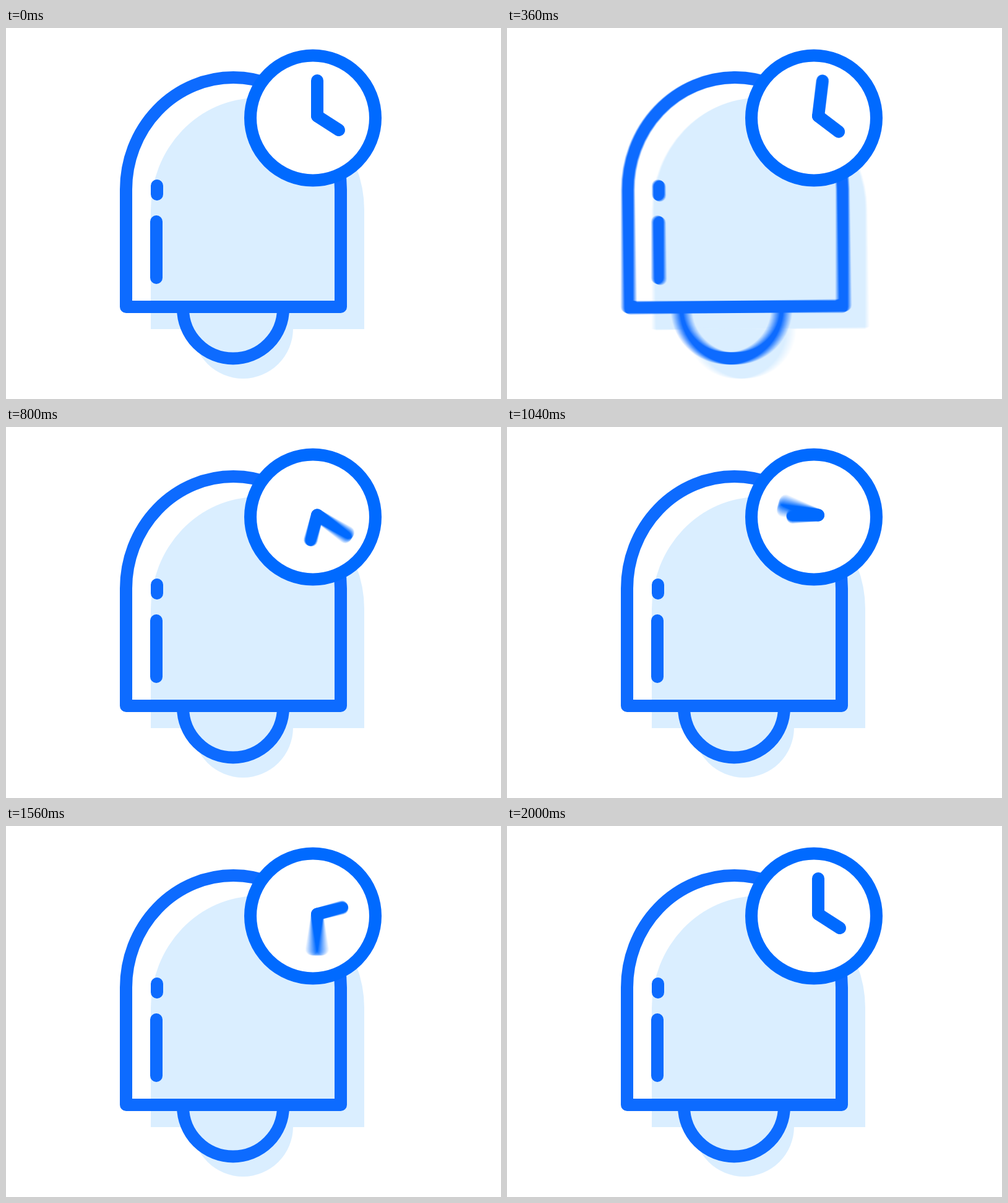
Animation of 800x600 px, one loop 2480 ms. Source, as an HTML page with a canvas:

```html
<!DOCTYPE html>
<html lang="en">
<head>
<meta charset="utf-8">
<title>Ringing bell with clock</title>
<style>
  html, body { margin: 0; width: 100%; height: 100%; overflow: hidden; background: #fff; }
  canvas { display: block; width: 800px; height: 600px; }
</style>
</head>
<body>
<canvas id="stage" width="800" height="600"></canvas>
<script>
const LOOP = 2480, STEP = 40, SHUTTER = 20, SAMPLES = 17;
const BELL_BLUE = '#0d6bff', CLOCK_BLUE = '#006aff', PALE = '#daeeff';
const BELL_PIVOT = [367.5, 80], HAND_PIVOT = [503, 142.5];

const stage = document.getElementById('stage').getContext('2d');
const layer = document.createElement('canvas');
layer.width = 800;
layer.height = 600;
const mask = layer.getContext('2d');

const shapes = {
  paleBell: new Path2D('M234 487V294A172.5 181 0 0 1 579 294V487Z'),
  paleClapper: new Path2D('M302 486A81 81 0 0 0 464 486Z'),
  bell: new Path2D('M194 451V261A173.5 181 0 0 1 541 261V451Z M244 255V269 M243 313V404'),
  clapper: new Path2D('M286 453.5A81 81 0 0 0 448 453.5'),
  minute: new Path2D('M503 142.5V85'),
  hour: new Path2D('M503 142.5L538 165')
};

// Swing keys: [time, degrees], cosine-eased between neighbours.
const bellKeys = [[0, 0], [240, 4], [480, -4.9], [590, 1.15], [720, 0]];
const clapperKeys = [[20, 0], [260, 4.8], [500, -5.2], [610, 1.2], [740, 0]];

function swing(keys, t) {
  if (t <= keys[0][0]) return 0;
  for (let i = 1; i < keys.length; i++) {
    const [t0, a] = keys[i - 1], [t1, b] = keys[i];
    if (t < t1) return a + (b - a) * (1 - Math.cos(Math.PI * (t - t0) / (t1 - t0))) / 2;
  }
  return 0;
}

// Cubic bezier easing through (x1, 0) and (x2, 1).
function ease(x, x1, x2) {
  if (x <= 0) return 0;
  if (x >= 1) return 1;
  let lo = 0, hi = 1;
  for (let i = 0; i < 30; i++) {
    const p = (lo + hi) / 2, q = 1 - p;
    if (3 * x1 * p * q * q + 3 * x2 * p * p * q + p * p * p < x) lo = p; else hi = p;
  }
  return lo * lo * (3 - 2 * lo);
}

const handProgress = t => (t - 200) / 1800;
const bellAngle = t => swing(bellKeys, t);
const clapperAngle = t => bellAngle(t) + swing(clapperKeys, t);
const minuteAngle = t => 1080 * ease(handProgress(t), 0.667, 0.584);
const hourAngle = t => 360 * ease(handProgress(t), 0.472, 0.585);

// Adds up the rotated shape over the open shutter, then tints the coverage.
function drawRotating(path, color, angleAt, pivot, t, stroke, cap = 'round') {
  const start = angleAt(t - SHUTTER / 2), end = angleAt(t + SHUTTER / 2);
  const count = Math.abs(end - start) < 0.02 && Math.abs(angleAt(t) - start) < 0.02 ? 1 : SAMPLES;
  mask.setTransform(1, 0, 0, 1, 0, 0);
  mask.globalAlpha = 1;
  mask.globalCompositeOperation = 'source-over';
  mask.clearRect(0, 0, 800, 600);
  mask.globalCompositeOperation = 'lighter';
  mask.globalAlpha = 1 / count;
  mask.fillStyle = mask.strokeStyle = '#fff';
  mask.lineWidth = 20;
  mask.lineCap = cap;
  mask.lineJoin = 'round';
  for (let i = 0; i < count; i++) {
    const offset = ((i + 0.5) / count - 0.5) * SHUTTER;
    mask.setTransform(1, 0, 0, 1, pivot[0], pivot[1]);
    mask.rotate(angleAt(t + offset) * Math.PI / 180);
    mask.translate(-pivot[0], -pivot[1]);
    if (stroke) mask.stroke(path); else mask.fill(path);
  }
  mask.setTransform(1, 0, 0, 1, 0, 0);
  mask.globalAlpha = 1;
  mask.globalCompositeOperation = 'source-in';
  mask.fillStyle = color;
  mask.fillRect(0, 0, 800, 600);
  stage.drawImage(layer, 0, 0);
}

function drawClockFace() {
  stage.beginPath();
  stage.arc(496, 145.5, 101, 0, 2 * Math.PI);
  stage.fillStyle = '#fff';
  stage.fill();
  stage.lineWidth = 20;
  stage.strokeStyle = CLOCK_BLUE;
  stage.stroke();
}

function draw(t) {
  stage.fillStyle = '#fff';
  stage.fillRect(0, 0, 800, 600);
  drawRotating(shapes.paleBell, PALE, bellAngle, BELL_PIVOT, t, false);
  drawRotating(shapes.paleClapper, PALE, clapperAngle, BELL_PIVOT, t, false);
  drawRotating(shapes.clapper, BELL_BLUE, clapperAngle, BELL_PIVOT, t, true, 'butt');
  drawRotating(shapes.bell, BELL_BLUE, bellAngle, BELL_PIVOT, t, true);
  drawClockFace();
  drawRotating(shapes.minute, CLOCK_BLUE, minuteAngle, HAND_PIVOT, t, true);
  drawRotating(shapes.hour, CLOCK_BLUE, hourAngle, HAND_PIVOT, t, true);
}

const origin = performance.now();
let shown = -1;

function tick() {
  const elapsed = (performance.now() - origin) % LOOP;
  const t = Math.floor(elapsed / STEP) * STEP;
  if (t !== shown) draw(shown = t);
  requestAnimationFrame(tick);
}
tick();
</script>
</body>
</html>
```
